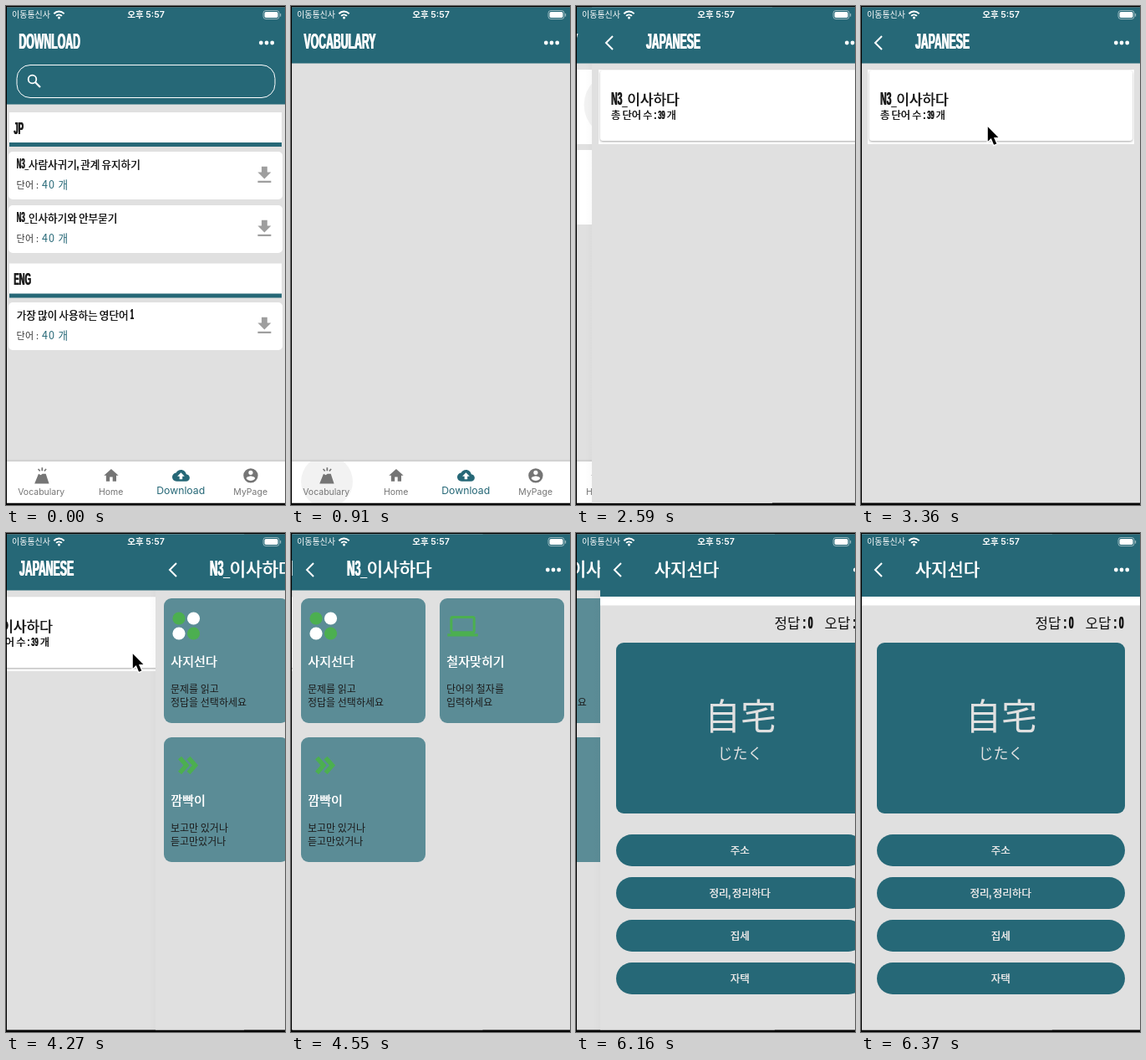
An HTML page with a canvas for the animation above (8 s loop, 334x596 px).

```html
<!DOCTYPE html>
<html lang="ko">
<head>
<meta charset="utf-8">
<title>Vocabulary app</title>
<style>
html, body { margin: 0; width: 100%; height: 100%; overflow: hidden; background: #000; }
canvas { display: block; width: 334px; height: 596px; }
</style>
</head>
<body>
<canvas id="stage"></canvas>
<script>
const W = 334, H = 596, LOOP = 8000, STEP = 70, PUSH = 400;
const TEAL = '#266877', BG = '#e0e0e0', CARD = '#5b8c96', GREEN = '#4caf50', INK = '#1c1c1c';
const KR = '"Noto Sans CJK KR", "Noto Sans CJK JP", sans-serif';
const JP = '"Noto Sans CJK JP", sans-serif';
const NARROW = 0.49, LATIN_SIZE = 1.25;

const canvas = document.getElementById('stage');
const dpr = window.devicePixelRatio || 1;
canvas.width = W * dpr;
canvas.height = H * dpr;
const ctx = canvas.getContext('2d');

const ICONS = {
  home: new Path2D('M10 20v-6h4v6h5v-8h3L12 3 2 12h3v8z'),
  cloud: new Path2D('M19.35 10.04C18.67 6.59 15.64 4 12 4 9.11 4 6.6 5.64 5.35 8.04 2.34 8.36 0 10.91 0 14c0 3.31 2.69 6 6 6h13c2.76 0 5-2.24 5-5 0-2.64-2.05-4.78-4.65-4.96zM14 13v4h-4v-4H7l5-5 5 5z'),
  person: new Path2D('M12 2a10 10 0 1 0 0 20 10 10 0 1 0 0-20zm0 3a3 3 0 1 1 0 6 3 3 0 1 1 0-6zm0 14.2c-2.5 0-4.7-1.3-6-3.2 0-2 4-3.1 6-3.1s6 1.1 6 3.1c-1.3 1.9-3.5 3.2-6 3.2z'),
  volcano: new Path2D('M2.5 23L8 9.5l3 1.8 2.5-1.8h4.5L22.5 23zM12 1h2v4.5h-2zM6.8 3.4l1.5-1.1 2.4 3.1-1.5 1.1zM17.7 2.3l1.5 1.1-2.4 3.1-1.5-1.1z'),
  save: new Path2D('M19 9h-4V3H9v6H5l7 7zM5 18v2h14v-2z'),
  laptop: new Path2D('M20 18a2 2 0 0 0 2-2V6a2 2 0 0 0-2-2H4a2 2 0 0 0-2 2v10a2 2 0 0 0 2 2H0v2h24v-2zM4 6h16v10H4z')
};

const clamp = v => Math.max(0, Math.min(1, v));

function rect(x, y, w, h, color) {
  ctx.fillStyle = color;
  ctx.fillRect(x, y, w, h);
}

function round(x, y, w, h, r, color) {
  ctx.beginPath();
  ctx.roundRect(x, y, w, h, r);
  ctx.fillStyle = color;
  ctx.fill();
}

function dot(x, y, r, color) {
  ctx.beginPath();
  ctx.arc(x, y, r, 0, Math.PI * 2);
  ctx.fillStyle = color;
  ctx.fill();
}

function line(points, width, color) {
  ctx.beginPath();
  points.forEach(([x, y]) => ctx.lineTo(x, y));
  ctx.lineWidth = width;
  ctx.strokeStyle = color;
  ctx.stroke();
}

function icon(name, x, y, scale, color) {
  ctx.save();
  ctx.translate(x, y);
  ctx.scale(scale, scale);
  ctx.fillStyle = color;
  ctx.fill(ICONS[name], 'evenodd');
  ctx.restore();
}

function label(text, x, y, font, color, align = 'left', spacing = 0) {
  ctx.font = font;
  ctx.letterSpacing = spacing + 'px';
  ctx.textAlign = align;
  ctx.fillStyle = color;
  ctx.fillText(text, x, y);
  ctx.letterSpacing = '0px';
}

// Display face: Hangul at its own width, Latin as a condensed heavy bold.
function display(text, x, y, size, color, { center = false, weight = 500 } = {}) {
  const runs = text.match(/[ -~]+|[^ -~]+/g).map(s => {
    const latin = /[ -~]/.test(s[0]);
    const font = latin ? `bold ${size * LATIN_SIZE}px "Liberation Sans", Arial, sans-serif` : `${weight} ${size}px ${KR}`;
    ctx.font = font;
    const squeeze = latin ? NARROW : 1;
    const spread = latin ? size * 0.045 : weight > 400 ? size * 0.035 : 0;
    return { s, font, squeeze, spread, width: ctx.measureText(s).width * squeeze };
  });
  if (center) x -= runs.reduce((sum, r) => sum + r.width, 0) / 2;
  for (const r of runs) {
    ctx.save();
    ctx.translate(x, y);
    ctx.scale(r.squeeze, 1);
    label(r.s, 0, 0, r.font, color);
    if (r.spread) ctx.fillText(r.s, r.spread / r.squeeze, 0);
    ctx.restore();
    x += r.width;
  }
}

function header(title, size, { back = false, bottom = 68.5 } = {}) {
  rect(0, 0, W, H, BG);
  rect(0, 0, W, bottom, TEAL);
  if (back) line([[25, 36], [17, 44], [25, 52]], 2, '#fff');
  display(title, back ? 64.5 : 15, 51.3, size, '#fff');
  for (const x of [305.3, 312, 318.7]) dot(x, 44, 2.4, '#fff');
}

function statusBar() {
  label('이동통신사', 7, 14, `10px ${KR}`, '#fff');
  ctx.lineWidth = 2;
  ctx.strokeStyle = '#fff';
  for (const r of [4.6, 8.4]) {
    ctx.beginPath();
    ctx.arc(63.5, 15, r, -Math.PI * 0.76, -Math.PI * 0.24);
    ctx.stroke();
  }
  dot(63.5, 14, 1.5, '#fff');
  label('오후 5:57', 167.5, 14.2, `600 10.6px Inter, ${KR}`, '#fff', 'center');
  ctx.beginPath();
  ctx.roundRect(308, 5.5, 19, 10, 3);
  ctx.lineWidth = 1;
  ctx.strokeStyle = 'rgba(255,255,255,.5)';
  ctx.stroke();
  round(309.5, 7, 16, 7, 1.8, '#fff');
  rect(328, 9, 1.2, 3.5, 'rgba(255,255,255,.5)');
}

const mixTab = k => `rgb(${[[117, 38], [117, 104], [117, 119]].map(([a, b]) => Math.round(a + (b - a) * k))})`;

// k moves the selection from Download (0) to Vocabulary (1).
function navBar(k, ripple = 0, fade = 0) {
  const shade = ctx.createLinearGradient(0, 541, 0, 544);
  shade.addColorStop(0, 'rgba(0,0,0,0)');
  shade.addColorStop(1, 'rgba(0,0,0,.1)');
  rect(0, 541, W, 3, shade);
  rect(0, 544, W, 50, '#fff');
  if (fade > 0) {
    ctx.save();
    ctx.beginPath();
    ctx.rect(0, 544, W, 50);
    ctx.clip();
    dot(43, 568, ripple, `rgba(0,0,0,${0.05 * fade})`);
    ctx.restore();
  }
  const tabs = [['Vocabulary', 'volcano', k], ['Home', 'home', 0], ['Download', 'cloud', 1 - k], ['MyPage', 'person', 0]];
  tabs.forEach(([name, glyph, on], i) => {
    const x = 42.2 + i * 83.5, color = mixTab(on);
    icon(glyph, x - 10.2, 550.4, 0.87, color);
    label(name, x, 583.8 - on * 0.8, `${10.5 + 1.75 * on}px Inter, sans-serif`, color, 'center');
  });
}

function section(name, y) {
  rect(4, y, 326, 37, '#fff');
  rect(4, y + 36, 326, 5, TEAL);
  display(name, 9, y + 25.5, 15.6, INK);
}

function downloadItem(title, y) {
  round(3, y, 328, 57, 5, '#fff');
  display(title, 12.5, y + 20, 12.6, INK);
  label('단어 :', 12.5, y + 43.5, `11px ${KR}`, '#333', 'left', 0.3);
  label('40 개', 43, y + 43.5, `12.6px ${KR}`, TEAL, 'left', 0.9);
  icon('save', 295.7, y + 14.3, 1.14, '#9e9e9e');
}

function downloadPage() {
  header('DOWNLOAD', 20, { bottom: 117.5 });
  ctx.beginPath();
  ctx.roundRect(13, 70.5, 309, 39, 16);
  ctx.lineWidth = 1;
  ctx.strokeStyle = '#fff';
  ctx.stroke();
  ctx.beginPath();
  ctx.arc(31.5, 87.5, 4.8, 0, Math.PI * 2);
  ctx.lineWidth = 1.8;
  ctx.stroke();
  line([[35, 91], [41, 97]], 2.2, '#fff');
  section('JP', 127);
  downloadItem('N3_사람사귀기, 관계 유지하기', 174);
  downloadItem('N3_인사하기와 안부묻기', 238);
  section('ENG', 307.5);
  downloadItem('가장 많이 사용하는 영단어 1', 354);
  navBar(0);
}

function languageTile(name, count, y, ripple) {
  rect(8, y, 319, 89, '#fff');
  if (ripple) {
    ctx.save();
    ctx.beginPath();
    ctx.rect(8, y, 319, 89);
    ctx.clip();
    dot(148, y + 42, ripple, 'rgba(0,0,0,.05)');
    ctx.restore();
  }
  display(name, 20.5, y + 42, 15.5, INK);
  display(`단어장 개수 : ${count}`, 20.5, y + 59, 12, INK);
}

function vocabularyPage(t) {
  const age = t - 910;
  header('VOCABULARY', 20);
  if (age >= STEP) {
    languageTile('JAPANESE', 1, 76, t >= 2380 ? 10 + (t - 2380) * 0.14 : 0);
    languageTile('ENGLISH', 2, 172, 0);
  }
  navBar(clamp(age / 210), 31 + age * 0.16, clamp(1 - age / 210));
}

function japanesePage() {
  header('JAPANESE', 20, { back: true });
  rect(8, 76, 319, 89, '#fff');
  ctx.save();
  ctx.shadowColor = 'rgba(0,0,0,.35)';
  ctx.shadowBlur = 2.5 * dpr;
  ctx.shadowOffsetY = dpr;
  round(10, 77, 315, 84, 3, '#fff');
  ctx.restore();
  display('N3_이사하다', 22.8, 117.5, 17, INK);
  display('총 단어 수 : 39 개', 22.8, 135, 12.3, INK);
}

function modeCard(x, y, title, lines) {
  round(x, y, 149, 149, 9, CARD);
  display(title, x + 8, y + 80.5, 15.1, '#fff');
  lines.forEach((s, i) => label(s, x + 8, y + 112.5 + i * 16, `12px ${KR}`, INK));
}

function menuPage() {
  header('N3_이사하다', 21.2, { back: true });
  modeCard(10, 78, '사지선다', ['문제를 읽고', '정답을 선택하세요']);
  modeCard(176, 78, '철자맞히기', ['단어의 철자를', '입력하세요']);
  modeCard(10, 244, '깜빡이', ['보고만 있거나', '듣고만있거나']);
  for (let i = 0; i < 4; i++) {
    dot(28 + (i % 2) * 17.5, 102 + (i >> 1) * 18, 7.6, i % 3 ? '#fff' : GREEN);
  }
  icon('laptop', 185.3, 93, 1.52, GREEN);
  for (const x of [29, 39.5]) line([[x, 268.5], [x + 8, 277.5], [x, 286.5]], 5.4, GREEN);
}

function quizPage() {
  header('사지선다', 21, { back: true, bottom: 76 });
  rect(0, 76, W, 10.5, '#fff');
  display('정답 : 0', 208.5, 113.5, 16.8, '#111', { weight: 400 });
  display('오답 : 0', 268.5, 113.5, 16.8, '#111', { weight: 400 });
  round(19, 131, 297, 204, 9, TEAL);
  label('自宅', 168, 234.5, `43px ${JP}`, BG, 'center');
  label('じたく', 167.5, 270, `18px ${JP}`, BG, 'center');
  ['주소', '정리, 정리하다', '집세', '자택'].forEach((answer, i) => {
    const y = 360 + i * 51;
    round(19, y, 297, 38, 19, TEAL);
    display(answer, 167, y + 23.5, 12.5, '#e6e6e6', { center: true });
  });
}

// Cubic bezier (.35,.91,.33,.97), solved for x by bisection.
function easePush(x) {
  const curve = (s, a, b) => 3 * (1 - s) ** 2 * s * a + 3 * (1 - s) * s * s * b + s ** 3;
  let lo = 0, hi = 1;
  for (let i = 0; i < 20; i++) {
    const mid = (lo + hi) / 2;
    if (curve(mid, 0.35, 0.33) < x) lo = mid; else hi = mid;
  }
  return curve(lo, 0.91, 0.97);
}

function push(t, start, from, to) {
  const p = easePush(clamp((t - start) / PUSH));
  const x = Math.round(W * (1 - p));
  ctx.save();
  ctx.translate(-W * 0.315 * p, 0);
  from(t);
  ctx.restore();
  const shade = ctx.createLinearGradient(x - 8, 0, x, 0);
  shade.addColorStop(0, 'rgba(0,0,0,0)');
  shade.addColorStop(1, 'rgba(0,0,0,.02)');
  rect(x - 8, 69, 8, H, shade);
  ctx.save();
  ctx.translate(x, 0);
  to(t);
  ctx.restore();
}

function cursor(x, y) {
  ctx.save();
  ctx.translate(x, y);
  ctx.beginPath();
  [[0, 0], [0, 17.5], [4, 13.8], [7.3, 21.5], [10.5, 20.1], [7.2, 12.6], [12.6, 12.6]].forEach(([a, b]) => ctx.lineTo(a, b));
  ctx.closePath();
  ctx.lineWidth = 2.4;
  ctx.strokeStyle = '#fff';
  ctx.stroke();
  ctx.fillStyle = '#000';
  ctx.fill();
  ctx.restore();
}

const SCENES = [
  [5950 + STEP, t => push(t, 5965, menuPage, quizPage)],
  [4550 + STEP, menuPage],
  [4270, t => push(t, 4198, japanesePage, menuPage)],
  [2800, japanesePage],
  [2380, t => push(t, 2369, vocabularyPage, japanesePage)],
  [910, vocabularyPage],
  [0, downloadPage]
];
const CURSORS = [[2030, 2380, 143.8, 116.3], [3360, 4340, 151.8, 144.3], [5950, 6020, 142.8, 168]];

function draw(t) {
  ctx.setTransform(dpr, 0, 0, dpr, 0, 0);
  rect(0, 0, W, H, '#000');
  ctx.save();
  ctx.beginPath();
  ctx.rect(1, 1.5, W - 1, 592);
  ctx.clip();
  SCENES.find(([start]) => t >= start)[1](t);
  statusBar();
  for (const [start, end, x, y] of CURSORS) if (t >= start && t < end) cursor(x, y);
  ctx.restore();
}

function frame() {
  const t = performance.now() % LOOP;
  draw(Math.floor(t / STEP) * STEP);
  requestAnimationFrame(frame);
}
frame();
</script>
</body>
</html>
```
